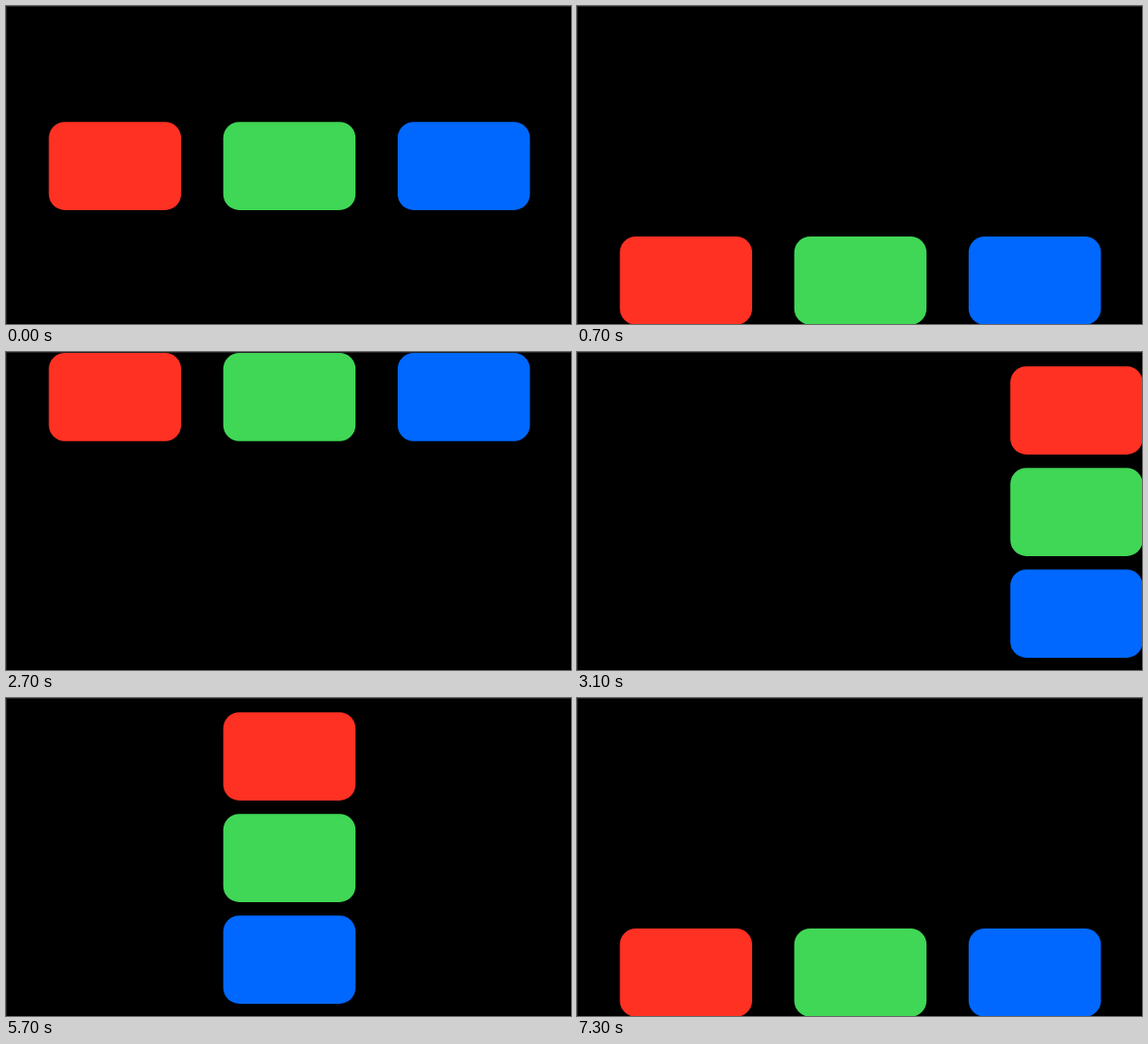
An HTML page that plays this animation: 600 px wide and 338 px high, repeating every 8 s.

```html
<!DOCTYPE html>
<html lang="en">
<head>
<meta charset="utf-8">
<title>Flex alignment</title>
<style>
  html, body { margin: 0; width: 100%; height: 100%; overflow: hidden; background: #000; }
  svg { display: block; width: 100%; height: 100%; }
</style>
</head>
<body>
<svg viewBox="0 0 600 338">
  <path d="M0 .5H600M.5 0V338" stroke="#222" fill="none"/>
  <g id="boxes">
    <rect fill="#ff3123"/>
    <rect fill="#40d656"/>
    <rect fill="#0068ff"/>
  </g>
</svg>
<script>
const LOOP = 8000;
const boxes = [...document.querySelectorAll('#boxes rect')];
for (const box of boxes) {
  box.setAttribute('width', 140.5);
  box.setAttribute('height', 93.7);
  box.setAttribute('rx', 17);
}

const row = y => i => [45.5 + 185.2 * i, y];
const column = x => i => [x, 15.2 + 108 * i];

// Each layout holds from its start time until the next one.
const layouts = [
  [0, row(123.2)],
  [500, row(245)],
  [1900, row(1)],
  [3100, column(460.2)],
  [4700, column(230.7)],
  [6100, column(1)],
  [7300, row(245)]
];

function draw(now) {
  const time = now % LOOP;
  const [, place] = layouts.findLast(([start]) => start <= time);
  boxes.forEach((box, i) => {
    const [x, y] = place(i);
    box.setAttribute('x', x);
    box.setAttribute('y', y);
  });
}

const origin = performance.now();
function tick() {
  draw(performance.now() - origin);
  requestAnimationFrame(tick);
}
tick();
</script>
</body>
</html>
```
